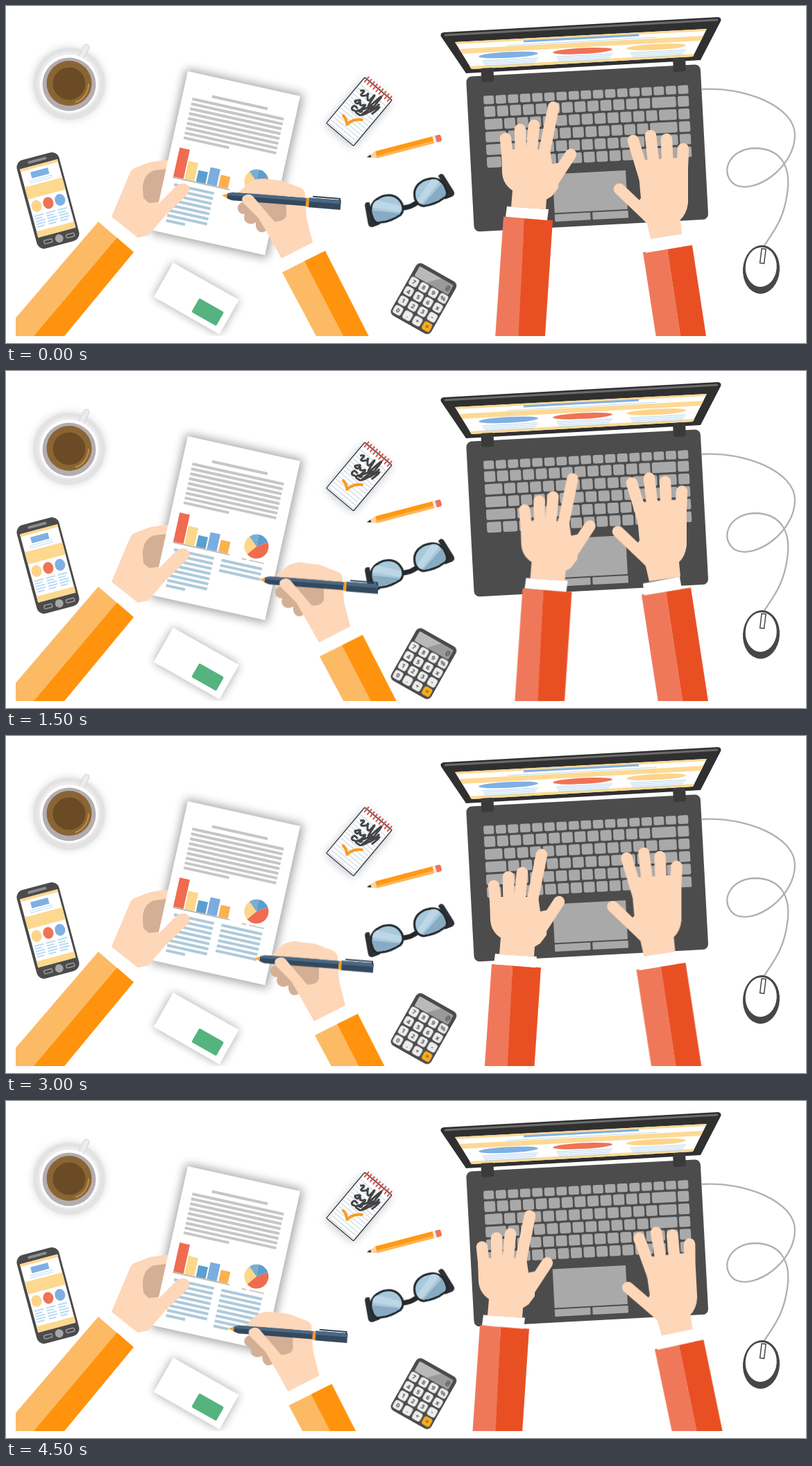
An HTML page for the animation above (5000 ms loop, 1153 by 486 pixels).

```html
<!DOCTYPE html>
<html lang="en">
<head>
<meta charset="utf-8">
<title>Desk work</title>
<style>
html, body { margin: 0; width: 100%; height: 100%; overflow: hidden; background: #fff; }
svg { display: block; width: 1153px; height: 486px; }
.move { animation: 5s step-end infinite; }
#penHand { animation-name: pen; }
#typeLeft { animation-name: left; }
#typeRight { animation-name: right; transform-origin: 918px 355px; }
#blank { animation-name: blank; transform-origin: 0 221px; }
.skin { fill: #fed6b8; }
.finger { fill: none; stroke: #fed6b8; stroke-width: 16.5; stroke-linecap: round; }
.shade { fill: #d3af95; }
.cuff { fill: #fff; }
.soft { fill: #000; filter: url(#blur); }
.keys { font: 700 9px "Open Sans", "Noto Sans", sans-serif; fill: #555; text-anchor: middle; }

@keyframes pen {
  0% { transform: translate(0, 0); }
  10% { transform: translate(57px, 18px); }
  20% { transform: translate(-2px, 15px); }
  30% { transform: translate(54px, 27.5px); }
  40% { transform: translate(-6px, 21px); }
  50% { transform: translate(22px, 37px); }
  60% { transform: translate(47px, 47.5px); }
  70% { transform: translate(-10px, 44px); }
  80% { transform: translate(44px, 55.5px); }
  90% { transform: translate(9.5px, 55px); }
}
@keyframes left {
  0% { transform: translate(0, 0); }
  10% { transform: translate(-7px, 5px); }
  20% { transform: translate(-13.5px, 10px); }
  30% { transform: translate(27.5px, 9.5px); }
  40% { transform: translate(-26px, 50.5px); }
  50% { transform: translate(-22px, 38px); }
  60% { transform: translate(-17px, 25px); }
  70% { transform: translate(-42px, 9px); }
  80% { transform: translate(-67px, -7px); }
  90% { transform: translate(-34px, 19.5px); }
}
@keyframes right {
  0% { transform: translate(0, 0); }
  10% { transform: translate(12px, 10px); }
  20% { transform: translate(23px, 20.5px); }
  30% { transform: translate(-2px, -32.5px); }
  40% { transform: translate(92.5px, 32px); }
  50% { transform: translate(42px, 7px); }
  60% { transform: translate(-9.5px, -18px); }
  70% { transform: translate(-26px, -35px) rotate(-5deg); }
  80% { transform: translate(-42px, -52px) rotate(-10.5deg); }
  90% { transform: translate(17px, 3px) rotate(-3deg); }
}
@keyframes blank {
  0% { transform: scaleY(1); }
  10% { transform: scaleY(.75); }
  30% { transform: scaleY(.625); }
  50% { transform: scaleY(.5); }
  60% { transform: scaleY(.25); }
  80% { transform: scaleY(.125); }
  90% { transform: scaleY(0); }
}
</style>
</head>
<body>
<svg viewBox="0 0 1153 486">
  <defs>
    <filter id="blur" x="-20%" y="-20%" width="140%" height="140%"><feGaussianBlur stdDeviation="7"/></filter>
    <clipPath id="stage"><path d="M14 0H1153V476H14Z"/></clipPath>
  </defs>
  <g clip-path="url(#stage)">

    <!-- coffee -->
    <g>
      <circle class="soft" cx="91" cy="112" r="50" opacity=".2"/>
      <circle cx="91" cy="112" r="52" fill="#e3e3e3"/>
      <circle cx="91" cy="111" r="45" fill="#ececec"/>
      <path d="M108 75 116 59" stroke="#d8d8d8" stroke-width="9" stroke-linecap="round"/>
      <path d="M108 75 116 59" stroke="#ececec" stroke-width="6.500" stroke-linecap="round"/>
      <circle cx="91" cy="112" r="42" fill="#fff"/>
      <circle cx="91" cy="113" r="38.500" fill="#b3adb0"/>
      <circle cx="91" cy="111.500" r="32.500" fill="#8a6534"/>
      <circle cx="91" cy="112" r="23.500" fill="#6a4b26"/>
      <path d="M119 112A28 28 0 0 1 100 139" fill="none" stroke="#c08d45" stroke-width="2"/>
    </g>

    <!-- phone -->
    <g id="phone" transform="translate(60.500 280.500) rotate(-15)">
      <rect x="-31.500" y="-66" width="63" height="132" rx="11" fill="#4b4b4b"/>
      <rect x="-14" y="-62" width="28" height="4" rx="2" fill="#8d8d8d"/>
      <rect x="-27.500" y="-54" width="56" height="102" fill="#fff"/>
      <path d="M-27.500-54h56v4h-56zM-27.500-27h56v18h-56zM-27.500 39h56v9h-56z" fill="#fdd88f"/>
      <path d="M-14-46h26v9h-26z" fill="#7fb0e4"/>
      <path d="M-18-34h34M-18-31h34" stroke="#bcdcf6"/>
      <ellipse cx="-18" cy="3.500" rx="7.500" ry="8.500" fill="#fdd48a"/>
      <ellipse cx="-.5" cy="3.500" rx="7.500" ry="8.500" fill="#ef7356"/>
      <ellipse cx="17" cy="3.500" rx="7.500" ry="8.500" fill="#7fb0e4"/>
      <circle cx="1.500" cy="57" r="6" fill="#a6a6a6"/>
      <g fill="none" stroke="#9b9b9b" stroke-width="1.500"><rect x="-21" y="54.500" width="12" height="5" rx="2"/><rect x="12" y="54.500" width="12" height="5" rx="2"/></g>
    </g>

    <!-- card -->
    <g transform="translate(241 370) rotate(29.600)">
      <rect class="soft" width="109" height="57" opacity=".35"/>
      <rect width="109" height="57" fill="#fff"/>
      <rect x="58" y="26" width="41" height="23" rx="2" fill="#55b37f"/>
    </g>

    <!-- report, with the hand holding it -->
    <path class="cuff" d="M152 303 202 334 184 355 133 311Z"/>
    <g transform="translate(262 94) rotate(12.500)">
      <rect class="soft" x="-3" y="-3" width="173" height="242" opacity=".36"/>
    </g>
    <path class="skin" d="M152 304 179 240Q181 235 187 233L208 225 240 221 232 290 205 330 190 334Z"/>
    <path class="shade" d="M231 235 214 237Q198 242 197 262L198 277 206 284 228 282Z"/>
    <g transform="translate(262 94) rotate(12.500)">
      <rect width="166" height="235" fill="#fff"/>
      <g id="text" stroke="#c6c6c6" stroke-width="4"></g>
      <g>
        <path d="M12.500 110h15v43h-15z" fill="#ef6c50"/>
        <path d="M29 126h14.500v27H29z" fill="#fdd78a"/>
        <path d="M46 136h14v17H46z" fill="#5c9fce"/>
        <path d="M62 128h14.500v25H62z" fill="#7badde"/>
        <path d="M79 135.500h14v17.500H79z" fill="#fcb14e"/>
        <path d="M12 154h84" stroke="#aaa" stroke-width="1.500"/>
        <path d="M114 155.500h7M125 155.500h22" stroke="#c8c8c8" stroke-width="2"/>
      </g>
      <g id="pie" transform="translate(131 133.800) rotate(-12.500)"></g>
      <g id="notes" stroke="#adcadb" stroke-width="4"></g>
      <rect id="blank" class="move" x="84" y="160" width="66" height="61" fill="#fff"/>
    </g>
    <path d="M133 311 184 355 84 476H0V466Z" fill="#fcba65"/>
    <path d="M160 334 184 355 84 476H40Z" fill="#ff930d"/>
    <path class="skin" d="M205 290 220 285 246 259Q256 253 262 258 268 265 261 272L229 303 205 331 189 334Z"/>

    <!-- notepad -->
    <g transform="translate(517 103) rotate(40)">
      <rect class="soft" x="1" y="2" width="51" height="86" opacity=".25"/>
      <rect width="51" height="86" rx="1" fill="#fff" stroke="#3b4350" stroke-width="1.500"/>
      <g id="pad"></g>
      <path d="M8 18q5-6 4 1t4 2 3-6 3 5 5-5 2 6 5-5 3 4 4-3M11 35q6-9 6-3t-5 4M19 32q1 5 5 0t2 4 5-5 2 5 5-5 4 2M20 41q-6-2-6 3t6 2M23 43q6 0 5-3t-5 3 7 3" fill="none" stroke="#444" stroke-width="3" stroke-linecap="round"/>
    </g>
    <path d="M486 158Q491 163 491.500 171 500 162 513 164" fill="none" stroke="#fb9a1e" stroke-width="4" stroke-linecap="round" stroke-linejoin="round"/>

    <!-- pencil -->
    <g transform="translate(520 218) rotate(-14.700)">
      <path d="M0 0 14-5V5Z" fill="#fcd0a0"/>
      <path d="M0 0 6-2.200V2.200Z" fill="#333"/>
      <path d="M14-5h86V5H14Z" fill="#ff9914"/>
      <path d="M14 1.500h86V5H14Z" fill="#fdb75a"/>
      <path d="M99-5h4V5h-4Z" fill="#eee"/>
      <path d="M103-5h5q3 0 3 3v4q0 3-3 3h-5Z" fill="#ee735f"/>
    </g>

    <!-- glasses -->
    <g transform="translate(579.500 280) rotate(-21)">
      <path id="side" d="M53-17Q59-21 61-15L66 11Q67 17 61 18L50 18 57 4Z" fill="#2c3035"/>
      <use href="#side" transform="scale(-1 1)"/>
      <path d="M-13 3Q0 9 13 3V11Q0 15-13 11Z" fill="#25282c"/>
      <g id="lens">
        <path d="M10 2Q12-16 31-18.500 52-19 56-3 59 12 52 15 35 20 18 16 10 12 10 2Z" fill="#a8c9dc" stroke="#25282c" stroke-width="3.200"/>
        <path d="M17 14 54-5Q57 11 51 13.500 35 18 17 14Z" fill="#86abc2"/>
        <path d="M13 4 42-16Q49-15 52-9L16 12Q12 9 13 4Z" fill="#bcd7e5"/>
      </g>
      <use href="#lens" transform="scale(-1 1)"/>
    </g>

    <!-- calculator -->
    <g id="calc" transform="translate(602 422) rotate(29.500)">
      <rect x="-33" y="-43" width="66" height="86" rx="7" fill="#4b4b4b"/>
      <rect x="-28" y="-38" width="56" height="16" rx="2" fill="#9a9a9a"/>
      <path d="M-28-36q0-2 2-2h34L-8-22h-18q-2 0-2-2z" fill="#b9b9b9"/>
      <text x="23" y="-26" font-family="Noto Sans Mono, monospace" font-size="11" text-anchor="middle" fill="#444">0</text>
    </g>

    <!-- laptop -->
    <path d="M627 44Q625 39 631 38L1026 16Q1032 17 1030 22L1001 78 663 97Z" fill="#303030"/>
    <path d="M632 42 1026 20" stroke="#6b6b6b" stroke-width="3"/>
    <path d="M647 52 1010 33 990 73 671 91Z" fill="#fff"/>
    <g fill="#fdd993">
      <path d="M647 52 1010 33 1008.500 36 649 55Z"/>
      <path d="M653 62 1005 43 1001.500 50 658 69Z"/>
      <path d="M668 87 992 69 990 73 671 91Z"/>
    </g>
    <g id="page">
      <path d="M746 51 912 42" stroke="#7fb0e4" stroke-width="3"/>
      <path d="M722 57 938 45" stroke="#bcdcf6"/>
    </g>
    <g transform="translate(663 102) rotate(-3.050)">
      <rect width="338" height="224" rx="8" fill="#4c4c4c"/>
      <g fill="#3a3a3a"><rect x="22" y="-11" width="18" height="20" rx="2"/><rect x="299" y="-11" width="18" height="20" rx="2"/></g>
      <g fill="#a9a9a9" id="keyboard">
        <rect x="117" y="147" width="105.500" height="56" rx="1"/>
        <rect x="117" y="205" width="51.500" height="10.500" rx="1"/>
        <rect x="171.500" y="205" width="51.500" height="10.500" rx="1"/>
      </g>
    </g>

    <!-- mouse -->
    <path d="M1003 120C1065 116 1137 145 1137 186 1137 232 1080 272 1051 258 1028 243 1040 207 1078 205 1122 205 1131 238 1126 270 1121 308 1106 325 1092 347" fill="none" stroke="#b0b0b0" stroke-width="2.300"/>
    <g transform="translate(1088.500 380) rotate(4)">
      <ellipse rx="26.500" ry="35" fill="#474747"/>
      <ellipse cx="-.5" cy="-3.500" rx="22.500" ry="28.500" fill="#fff"/>
      <rect x="-3" y="-30" width="6" height="21" fill="#fff" stroke="#474747" stroke-width="1.500" transform="rotate(3)"/>
    </g>

    <!-- writing hand -->
    <g id="penHand" class="move">
      <path d="M398 384 430 368 550 600H513Z" fill="#fcba65"/>
      <path d="M430 368 460 353 586 600H550Z" fill="#ff930d"/>
      <path class="cuff" d="M387 369 440 341 450 357 398 384Z"/>
      <path class="shade" d="M340 283Q331 288 335 296 339 301 344 300 341 309 348 313 354 316 360 312 359 322 366 326 374 328 380 318L372 285Z"/>
      <path class="skin" d="M332 272 351 254Q358 249 371 249L398 252 424 262Q431 265 431 272L433 305 442 341 397 364 376 326 372 285Z"/>
      <path class="shade" d="M352 270 404 274 404 302Q402 311 386 311L360 285Z"/>
      <g transform="translate(311 273) rotate(4.500)">
        <path d="M0 0 9-3.500V4Z" fill="#f8a434"/>
        <path d="M8-3.500 15-5.500H122V6H15L8 4Z" fill="#34495d"/>
        <path d="M8-3.500 15-5.500H122V-1H8Z" fill="#496885"/>
        <path d="M122-6h4V7h-4Z" fill="#ff9a1a"/>
        <path d="M126-6.500H172V7.500H126Z" fill="#34495d"/>
        <path d="M126-6.500H172V-1H126Z" fill="#496885"/>
        <path d="M131-8.500H170V-5" fill="none" stroke="#2d3f51" stroke-width="2"/>
      </g>
      <path class="skin" d="M341 283Q338 274 347 272 354 271 358 277L387 311 412 340 396 361 378 330 364 306Z"/>
    </g>

    <!-- typing hands -->
    <g id="typeLeft" class="move">
      <path d="M717 304 747 306 735 610H696Z" fill="#f0785a"/>
      <path d="M747 306 788 309 768 610H732Z" fill="#e85024"/>
      <path class="cuff" d="M722 289 782 293 780 309 720 304Z"/>
      <path class="skin" d="M714 207H784L787 228 797 226 796 262 787 274 779 279 778 293 728 290 730 266Q716 257 715 240Z"/>
      <path class="finger" d="M720 191 725 240M741 178 742 225M761 172 756 225M789 146 773 225M814 214 780 266"/>
    </g>
    <g id="typeRight" class="move">
      <path d="M918 355 953 350 994 620H959Z" fill="#f0785a"/>
      <path d="M953 350 989 345 1031 620H994Z" fill="#e85024"/>
      <path class="cuff" d="M920 339 973 329 976 347 922 356Z"/>
      <path class="skin" d="M910 222 983 218 983 284Q981 300 972 308L974 329 929 336 924 314 904 292 915 277Z"/>
      <path class="finger" d="M904 194 921 250M929 187 935 240M952 192 954 240M976 206 973 275M884 264 926 304"/>
    </g>
  </g>
</svg>
<script>
const $ = id => document.getElementById(id);

function add(parent, tag, attrs, text) {
  const el = document.createElementNS('http://www.w3.org/2000/svg', tag);
  for (const k in attrs) el.setAttribute(k, attrs[k]);
  if (text) el.textContent = text;
  parent.appendChild(el);
  return el;
}
const line = (parent, x1, x2, y, attrs) =>
  add(parent, 'path', { d: `M${x1} ${y}H${x2}`, ...attrs });

// Report text: heading, paragraph and two columns
line($('text'), 42, 124, 28);
for (let i = 0; i < 9; i++) line($('text'), 15, i < 8 ? 150 : 82, 37.7 + i * 7.15);
for (let i = 0; i < 8; i++) {
  const y = 164 + i * 7.55;
  line($('notes'), 16, i < 7 ? 75 : 44, y);
  line($('notes'), 86, i < 7 ? 146 : 108, y);
}

function slice(from, to, color) {
  const at = a => [Math.cos(a * Math.PI / 180) * 17.5, Math.sin(a * Math.PI / 180) * 17.5].join(' ');
  add($('pie'), 'path', { d: `M0 0L${at(from)}A17.5 17.5 0 0 1 ${at(to)}Z`, fill: color });
}
slice(-20, 140, '#ef6c50');
slice(140, 235, '#fdd78a');
slice(235, 280, '#7badd0');
slice(280, 340, '#5c9fce');

// Notepad ruling and coil
for (let y = 12; y < 84; y += 5.5) line($('pad'), 2, 49, y, { stroke: '#c5d3df' });
for (let x = 4; x < 50; x += 5.4)
  add($('pad'), 'path', { d: `M${x}-4V5`, stroke: '#d9534a', 'stroke-width': 2, 'stroke-linecap': 'round' });

// Text blocks on the phone and laptop pages
for (const x of [-18, -.5, 17])
  for (let y = 17; y < 37; y += 4)
    line($('phone'), x - 7, x + (y % 3 ? 7 : 4), y, { stroke: '#b9daf5', 'stroke-width': 2 });

[['#7fb0e4', 724, 70.5], ['#ef7356', 831, 64.8], ['#fdd48a', 937, 59]].forEach(([fill, x, y]) => {
  const block = add($('page'), 'g', { transform: `translate(${x} ${y}) rotate(-3)` });
  add(block, 'ellipse', { rx: 43, ry: 4.3, fill });
  for (let i = 0; i < 4; i++) line(block, -38 + i, 43 - i * 2, 6.5 + i * 2.4, { stroke: '#b5d6f2' });
});

// Calculator keys
[...'789%456x123-0.+='].forEach((c, i) => {
  const x = -24 + i % 4 * 16, y = -14 + (i >> 2) * 15.6;
  add($('calc'), 'rect', { x: x - 6.5, y: y - 6.5, width: 13, height: 13, rx: 3.5, fill: c === '=' ? '#fcab1c' : '#ededed' });
  add($('calc'), 'text', { x, y: y + 3.2, class: 'keys' }, c);
});

// Keyboard rows as relative key widths, each row filling the same length
const ones = n => Array(n).fill(1);
const rows = [
  ones(17),
  [...ones(13), 2, 1],
  [1.5, ...ones(12), 1.5, 1],
  [1.75, ...ones(11), 2.25, 1],
  [2.4, ...ones(10), 1.6, 1, 1],
  [1.25, 1.25, ...ones(9), 1.5, ...ones(3)]
];
rows.forEach((row, i) => {
  const unit = 298 / row.reduce((a, b) => a + b);
  let x = 23.5;
  for (const w of row) {
    add($('keyboard'), 'rect', {
      x, y: i ? 44.3 + (i - 1) * 18.3 : 29, width: w * unit - 2.6, height: i ? 15.3 : 12.3, rx: 2.5
    });
    x += w * unit;
  }
});
</script>
</body>
</html>
```
